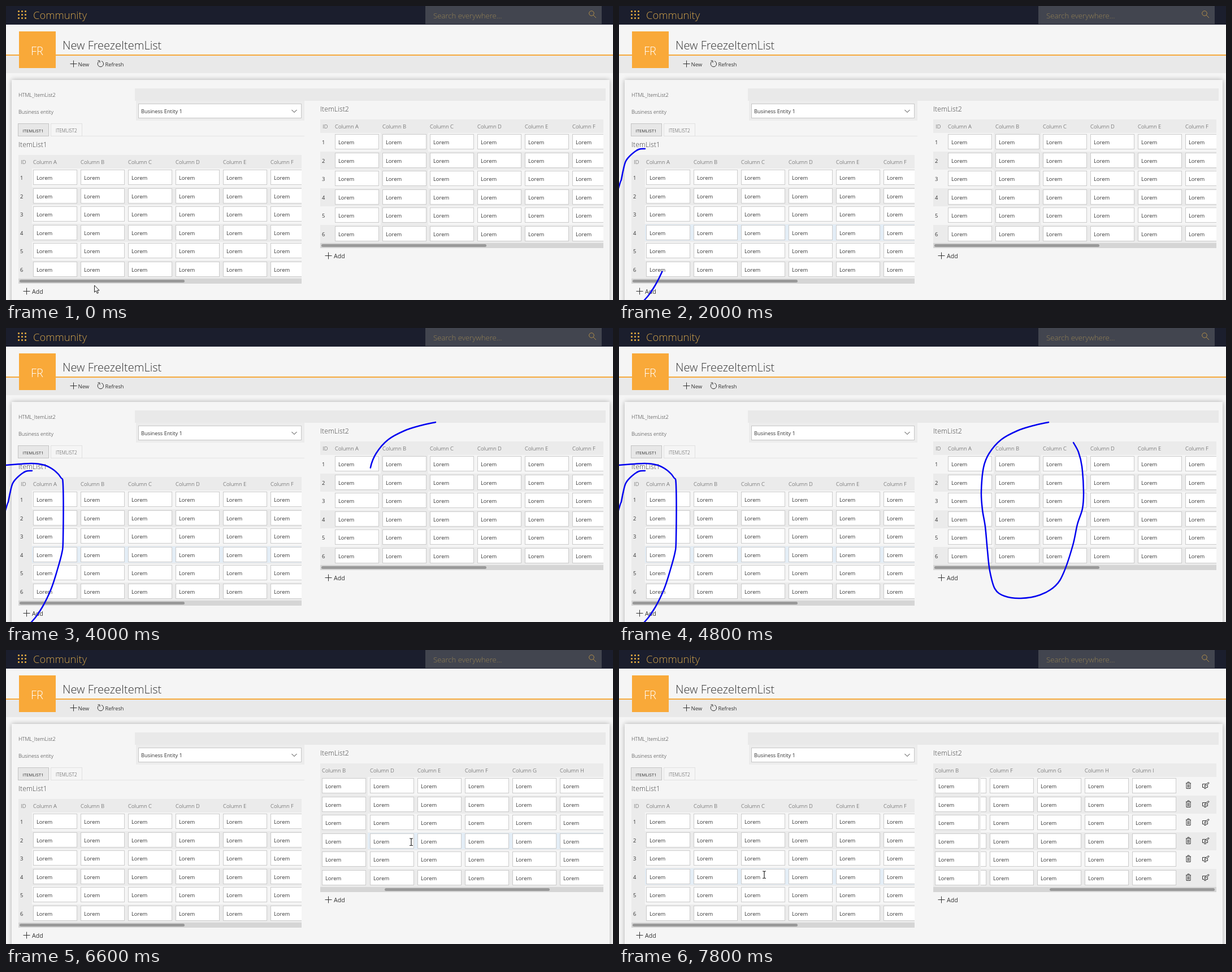
An HTML page that plays this animation: 1074 by 521 pixels, repeating every 8 s.

```html
<!DOCTYPE html>
<html lang="en">
<head>
<meta charset="utf-8">
<title>Frozen item list columns</title>
<style>
  html, body { margin: 0; width: 100%; height: 100%; overflow: hidden; background: #f5f5f5; }
  svg { display: block; }
  text { font-family: "Open Sans", "Noto Sans", sans-serif; font-size: 9.4px; fill: #333; white-space: pre; }
  .light { font-weight: 300; }
  .icon { fill: none; stroke: #333; stroke-width: 1; }
  .ink { fill: none; stroke: #0000f0; stroke-width: 2.5; stroke-linecap: round; stroke-linejoin: round; }
</style>
</head>
<body>
<svg id="stage" width="1074" height="521" viewBox="0 0 1074 521">
  <defs>
    <filter id="shadow" x="-5%" y="-5%" width="110%" height="110%">
      <feDropShadow dx="0" dy="0" stdDeviation="4" flood-color="#000" flood-opacity=".3"/>
    </filter>
  </defs>
</svg>
<script>
const LOOP = 8000, STEP = 200;
const ROW = 32.6, HEAD = 24, COL = 84, FIRST = 26, WIDTH = 501;
const GRAY = '#ebebeb', EDGE = '#cbcbcb';
const stage = document.getElementById('stage');

function add(parent, tag, attrs, content) {
  const node = document.createElementNS('http://www.w3.org/2000/svg', tag);
  for (const key in attrs) node.setAttribute(key, attrs[key]);
  if (content !== undefined) node.textContent = content;
  return parent.appendChild(node);
}
const rect = (parent, x, y, width, height, fill, more) =>
  add(parent, 'rect', { x, y, width, height, fill, ...more });
const box = (parent, x, y, w, h, fill, stroke) =>
  rect(parent, x + .5, y + .5, w - 1, h - 1, fill, { stroke });
const label = (parent, x, y, content, size = 9.4, fill = '#333', light = false) =>
  add(parent, 'text', { x, y, class: light ? 'light' : '', style: `font-size:${size}px;fill:${fill}` }, content);
const icon = (parent, d, more) => add(parent, 'path', { d, class: 'icon', ...more });
const plusIcon = (x, y) => icon(stage, `M${x - 5.5} ${y + .5}h12M${x + .5} ${y - 5.5}v12`);

function drawHeader() {
  rect(stage, 0, 0, 1074, 33, '#1b1e2d');
  for (let i = 0; i < 9; i++)
    rect(stage, 21 + i % 3 * 6, 8 + Math.floor(i / 3) * 6, 3, 3, '#d6a240', { rx: 1 });
  label(stage, 48, 23, 'Community', 18.4, '#cfa14a', true);
  rect(stage, 742, 0, 312, 32, '#42454f');
  label(stage, 756, 22, 'Search everywhere...', 13.2, '#958255', true);
  icon(stage, 'M1039.2 16.2L1044 21M1040.3 13a4.3 4.3 0 1 1-8.6 0a4.3 4.3 0 1 1 8.6 0', { style: 'stroke:#b08d4a' });

  rect(stage, 0, 86, 1074, 2, '#f6a93b');
  rect(stage, 0, 88, 1074, 31, '#e9e9e9');
  rect(stage, 23, 45, 65, 65, '#f9a939');
  label(stage, 44, 87, 'FR', 20, '#fff', true);
  label(stage, 100, 77, 'New FreezeItemList', 20, '#333', true);
  plusIcon(119, 102);
  label(stage, 127.5, 106.5, 'New', 9.5);
  icon(stage, 'M169 97.6A5.2 5.2 0 1 1 164.5 98.2M162.5 97h3.5v3.5');
  label(stage, 175.5, 106.5, 'Refresh', 9.3);
}

function drawForm() {
  rect(stage, 10, 131, 1058, 410, '#f5f5f5', { filter: 'url(#shadow)' });
  rect(stage, 228, 146, 833, 22, '#e9e9e9');
  rect(stage, 230, 168, 298, 35, '#ececec');
  label(stage, 22, 161, 'HTML_ItemList2', 9.2, '#333', true);
  label(stage, 22, 191, 'Business entity', 9.2, '#333', true);
  box(stage, 234, 173, 289, 26, '#fff', '#c6c6c6');
  label(stage, 239, 190, 'Business Entity 1', 9.3);
  icon(stage, 'M505.5 184l4.5 4.5l4.5-4.5');
  rect(stage, 80, 230, 448, 1, '#e4e4e4');
  box(stage, 21, 208, 55, 23, '#e7e7e7', '#c4c4c4');
  box(stage, 79, 208, 56, 23, '#f5f5f5', '#e0e0e0');
  label(stage, 29.5, 224, 'ITEMLIST1', 7.8);
  label(stage, 88, 224, 'ITEMLIST2', 8.2, '#444', true);
}

const rowTop = row => HEAD + row * ROW;
const eachRow = draw => { for (let r = 0; r < 6; r++) draw(r, Math.round(rowTop(r))); };

function drawColumn(parent, index) {
  const x = FIRST + index * COL;
  label(parent, x, 16, 'Column ' + 'ABCDEFGHI'[index], 9.6, '#444', true);
  eachRow((r, y) => {
    box(parent, x, y + 2, 78, 27, '#fff', EDGE);
    label(parent, x + 6, y + 20, 'Lorem');
  });
}

function drawIds(parent) {
  label(parent, 4.5, 15.5, 'ID', 9.4, '#444', true);
  eachRow((r, y) => label(parent, 3, y + 20, r + 1));
}

function drawActions(parent) {
  eachRow((r, y) => {
    icon(parent, `M793 ${y + 11}h9M796 ${y + 10.5}v-1.5h3v1.5M794 ${y + 11}v9.5h7v-9.5M796.5 ${y + 13}v6M798.5 ${y + 13}v6`);
    icon(parent, `M829 ${y + 12.5}h-6.5v6h9v-4M825 ${y + 20.5}h4M826 ${y + 16.5}l1-2.5l6-4.5l1.2 1.5l-5.7 4.7z`);
  });
}

function makeTable(x, y, title, frozen) {
  label(stage, x, y - 14, title, 12.3, '#444', true);
  const view = add(stage, 'svg', { x, y, width: WIDTH, height: 228 });
  rect(view, 0, 0, WIDTH, HEAD, GRAY);
  eachRow((r, top) => rect(view, 0, top, WIDTH, 33, r % 2 ? GRAY : '#f5f5f5'));
  const hover = rect(view, 0, 0, WIDTH, 29, '#e3edf6');
  const content = add(view, 'g');
  const pinned = add(view, 'g');
  for (let c = 0; c < 9; c++) if (c !== frozen) drawColumn(content, c);
  drawActions(content);
  if (frozen < 0) {
    rect(pinned, 0, 0, 24, 220, GRAY);
    drawIds(pinned);
  } else {
    drawIds(content);
    rect(pinned, FIRST + frozen * COL - 3, 0, COL, 220, GRAY);
    drawColumn(pinned, frozen);
  }
  rect(view, 0, 219, WIDTH, 9, '#d5d5d5');
  const thumb = rect(view, 2, 221, 292, 5, '#999', { rx: 2.5 });
  plusIcon(x + 14, y + 241);
  label(stage, x + 24, y + 245.5, 'Add', 10.6);

  return {
    x, y,
    scroll(offset) {
      content.setAttribute('transform', `translate(${-offset} 0)`);
      const pin = frozen < 0 ? 0 : Math.max(-offset, 3 - FIRST - frozen * COL);
      pinned.setAttribute('transform', `translate(${pin} 0)`);
      thumb.setAttribute('x', 2 + offset * 204 / 346);
    },
    rowAt(px, py) {
      const row = Math.floor((py - y - HEAD) / ROW);
      return px >= x && px < x + WIDTH && row >= 0 && row < 6 ? row : -1;
    },
    highlight(row) {
      hover.setAttribute('visibility', row < 0 ? 'hidden' : 'visible');
      hover.setAttribute('y', Math.round(rowTop(row)) + 1);
    }
  };
}

// Smooth curve through the points, revealed by its dash offset.
function makeStroke(points) {
  const at = i => points[Math.max(0, Math.min(points.length - 1, i))];
  let d = 'M' + at(0);
  for (let i = 0; i < points.length - 1; i++) {
    const [a, b, c, e] = [at(i - 1), at(i), at(i + 1), at(i + 2)];
    const c1 = b.map((v, k) => v + (c[k] - a[k]) / 6);
    const c2 = c.map((v, k) => v - (e[k] - b[k]) / 6);
    d += `C${c1} ${c2} ${c}`;
  }
  const path = add(stage, 'path', { d, class: 'ink', pathLength: 1 });
  return part => {
    path.setAttribute('visibility', part > 0 ? 'visible' : 'hidden');
    path.setAttribute('stroke-dasharray', part < 1 ? `${part} 2` : 'none');
  };
}

drawHeader();
drawForm();
const left = makeTable(22, 264, 'ItemList1', -1);
const right = makeTable(556, 201, 'ItemList2', 1);

const loopLeft = makeStroke([
  [46, 253], [35, 254], [22, 263], [12, 275], [7, 293], [4, 308], [0, 320],
  [-22, 400], [-12, 510], [20, 540], [46, 520], [64, 495], [80, 462], [91, 428],
  [99, 398], [101, 375], [101, 280], [97, 265], [85, 252], [68, 243], [45, 240], [0, 243]
]);
const loopRight = makeStroke([
  [760, 167], [733, 173], [705, 182], [676, 198], [655, 222], [645, 247], [641, 290],
  [643, 322], [648, 352], [652, 395], [656, 430], [665, 462], [682, 475], [711, 479],
  [745, 473], [772, 457], [787, 433], [803, 385], [811, 348], [820, 320], [822, 290],
  [819, 245], [813, 220], [804, 203]
]);

const cursors = {
  arrow: add(stage, 'path', { d: 'M.5 0v12.2l2.8-2.5l2 4.6l2-.9l-2-4.4h3.8z', fill: '#fff', stroke: '#222' }),
  beam: add(stage, 'path', { d: 'M-3-6h2.2l.8 .8l.8-.8h2.2M0-5v11M-3 6.500h2.200l.8-.8l.8 .8h2.200', fill: 'none', stroke: '#222', 'stroke-width': 1.2 }),
  cross: add(stage, 'path', { d: 'M-4 0h8M0-4v8', fill: 'none', stroke: '#0000f0', 'stroke-width': 2 })
};

// time, cursor kind, x, y
const moves = [
  [0, 'arrow', 156, 495], [400, 'beam', 140, 440], [600, 'beam', 110, 402],
  [800, 'cross', 70, 330], [1000, 'cross', 46, 279], [1200, 'cross', 46, 254],
  [1400, 'none', 46, 254], [2800, 'cross', 300, 259], [3000, 'cross', 632, 213],
  [3200, 'cross', 632, 213], [3600, 'cross', 606, 194], [3800, 'cross', 740, 160],
  [4000, 'none', 760, 167], [5000, 'arrow', 804, 160], [5400, 'beam', 770, 230],
  [6000, 'beam', 709, 363], [6200, 'beam', 709, 363], [6600, 'beam', 717, 340],
  [7000, 'beam', 717, 340], [7200, 'beam', 700, 370], [7400, 'arrow', 535, 385],
  [7600, 'beam', 400, 398], [7800, 'beam', 257, 398]
];

function cursorAt(time) {
  const i = moves.findLastIndex(move => move[0] <= time);
  const [start, kind, x, y] = moves[i];
  const [end, , nx, ny] = moves[i + 1] || [LOOP, kind, x, y];
  const k = (time - start) / (end - start);
  return { kind, x: x + (nx - x) * k, y: y + (ny - y) * k };
}

const ramp = (time, from, to) => Math.max(0, Math.min(1, (time - from) / (to - from)));

function render(time) {
  const { kind, x, y } = cursorAt(time);
  for (const name in cursors) {
    cursors[name].setAttribute('visibility', name === kind ? 'visible' : 'hidden');
    cursors[name].setAttribute('transform', `translate(${x} ${y})`);
  }
  const annotating = time >= 800 && time < 5000;
  const pointing = kind === 'beam';
  left.highlight(annotating ? 3 : pointing ? left.rowAt(x, y) : -1);
  right.highlight(pointing ? right.rowAt(x, y) : -1);
  right.scroll(Math.min(346, Math.round(ramp(time, 6000, 7200) * 380)));
  loopLeft(annotating ? ramp(time, 1200, 2600) : 0);
  loopRight(annotating ? ramp(time, 3800, 4800) : 0);
}

left.scroll(0);
function tick() {
  render(Math.floor(performance.now() % LOOP / STEP) * STEP);
  requestAnimationFrame(tick);
}
tick();
</script>
</body>
</html>
```
